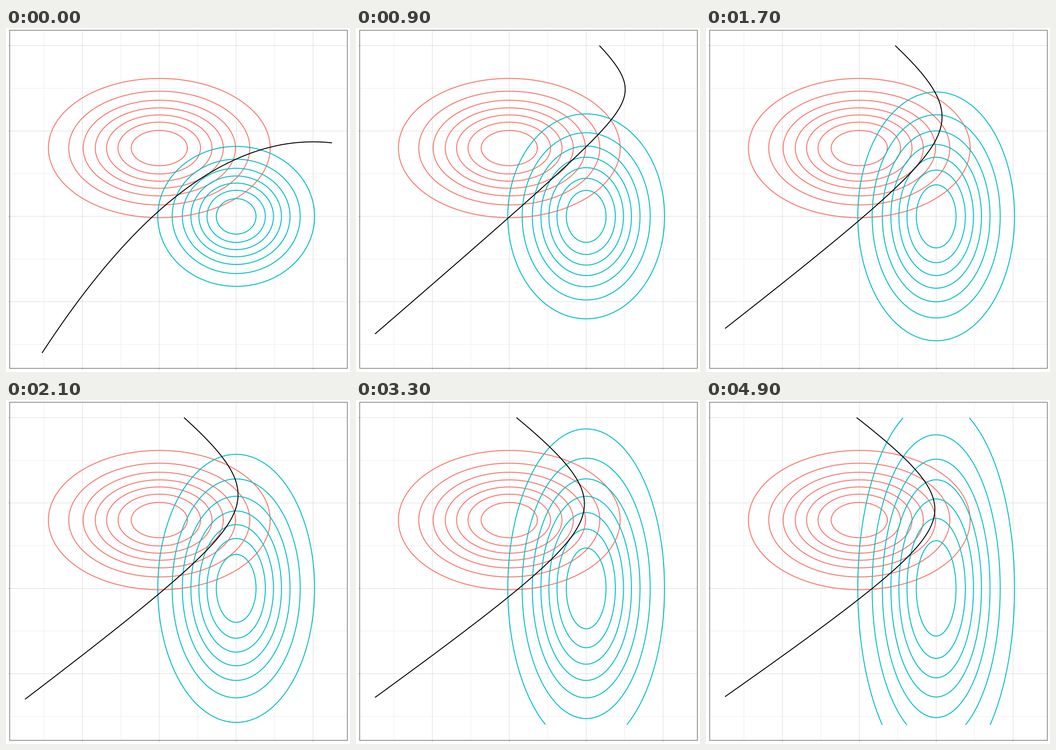
Write a matplotlib script that moves like this. It is 748x748 px and loops after 5000 ms.

```python
import numpy as np
import matplotlib.pyplot as plt
from matplotlib.animation import FuncAnimation

SIZE, DPI, FRAMES, INTERVAL = 748, 64, 50, 100
PX = 72 / DPI  # one pixel in points
RED, TEAL = "#F8766D", "#00BFC4"

# data -> pixel mapping
X0, Y0, UX, UY = 333.3, 409.6, 33.44, 37.13
X_RANGE, Y_RANGE = (-8.73, 11.23), (-8, 10)
RADII = np.sqrt(-2 * np.log(np.arange(1, 8) / 8))
THETA = np.linspace(0, 2 * np.pi, 1441)

RED_MEAN, RED_VAR = (0, 4), (12.5, 4)
TEAL_MEAN, TEAL_VAR_X = (5, 0), 6.25


def to_px(x, y):
    return X0 + UX * x, Y0 - UY * y


def teal_variance(frame):
    return TEAL_VAR_X, 4.04 + 0.513 * frame


def ring(mean, var, radius):
    x = mean[0] + radius * np.sqrt(var[0]) * np.cos(THETA)
    y = mean[1] + radius * np.sqrt(var[1]) * np.sin(THETA)
    y = np.where((y < Y_RANGE[0]) | (y > Y_RANGE[1]), np.nan, y)
    return to_px(x, y)


def deviance(x, y, mean, var):
    return ((x - mean[0]) ** 2 / var[0] + (y - mean[1]) ** 2 / var[1]
            + np.log(var[0] * var[1]))


fig = plt.figure(figsize=(SIZE / DPI, SIZE / DPI), dpi=DPI, facecolor="white")
ax = fig.add_axes([0, 0, 1, 1])
ax.axis("off")


def rule(xs, ys, color, zorder=1):
    ax.plot(xs, ys, color=color, lw=PX, zorder=zorder, snap=False,
            solid_capstyle="butt", solid_joinstyle="miter")


# panel: the data range plus 5% on each side
pad_x, pad_y = (0.05 * np.ptp(r) for r in (X_RANGE, Y_RANGE))
left, bottom = to_px(X_RANGE[0] - pad_x, Y_RANGE[0] - pad_y)
right, top = to_px(X_RANGE[1] + pad_x, Y_RANGE[1] + pad_y)

for half_step, color in ((2.5, "#ececec"), (0, "#dadada")):
    for v in np.arange(-5, 11, 5) - half_step:
        px, py = to_px(v, v)
        rule([px, px], [top, bottom], color)
        rule([left, right], [py, py], color)
for v in (-5, 0, 5, 10):
    px, py = to_px(v, v)
    rule([px, px], [bottom, bottom + 3], "#b0b0b0")
    rule([left - 3, left], [py, py], "#b0b0b0")
rule([left, right, right, left, left], [top, top, bottom, bottom, top],
     "#333333", 6)

for r in RADII:
    ax.plot(*ring(RED_MEAN, RED_VAR, r), color=RED, lw=2 * PX, zorder=3)
teal_lines = [ax.plot([], [], color=TEAL, lw=2 * PX, zorder=4,
                      solid_capstyle="butt")[0] for _ in RADII]
peak, = ax.plot(*to_px(*TEAL_MEAN), "o", color=TEAL, ms=PX, mew=0,
                alpha=0.7, zorder=4)

GX, GY = np.meshgrid(np.linspace(*X_RANGE, 300), np.linspace(*Y_RANGE, 300))
GRID_PX = to_px(GX, GY)
RED_DEVIANCE = deviance(GX, GY, RED_MEAN, RED_VAR)
boundary = None


def update(frame):
    global boundary
    var = teal_variance(frame)
    for line, r in zip(teal_lines, RADII):
        line.set_data(*ring(TEAL_MEAN, var, r))
    peak.set_visible(frame >= 37)
    if boundary is not None:
        boundary.remove()
    gap = RED_DEVIANCE - deviance(GX, GY, TEAL_MEAN, var)
    boundary = ax.contour(*GRID_PX, gap, levels=[0], colors="black",
                          linewidths=2 * PX, zorder=5)
    ax.set_xlim(0, SIZE)
    ax.set_ylim(SIZE, 0)
    return teal_lines


anim = FuncAnimation(fig, update, frames=FRAMES, interval=INTERVAL,
                     init_func=lambda: [], repeat=True, repeat_delay=0)
plt.show()
```
